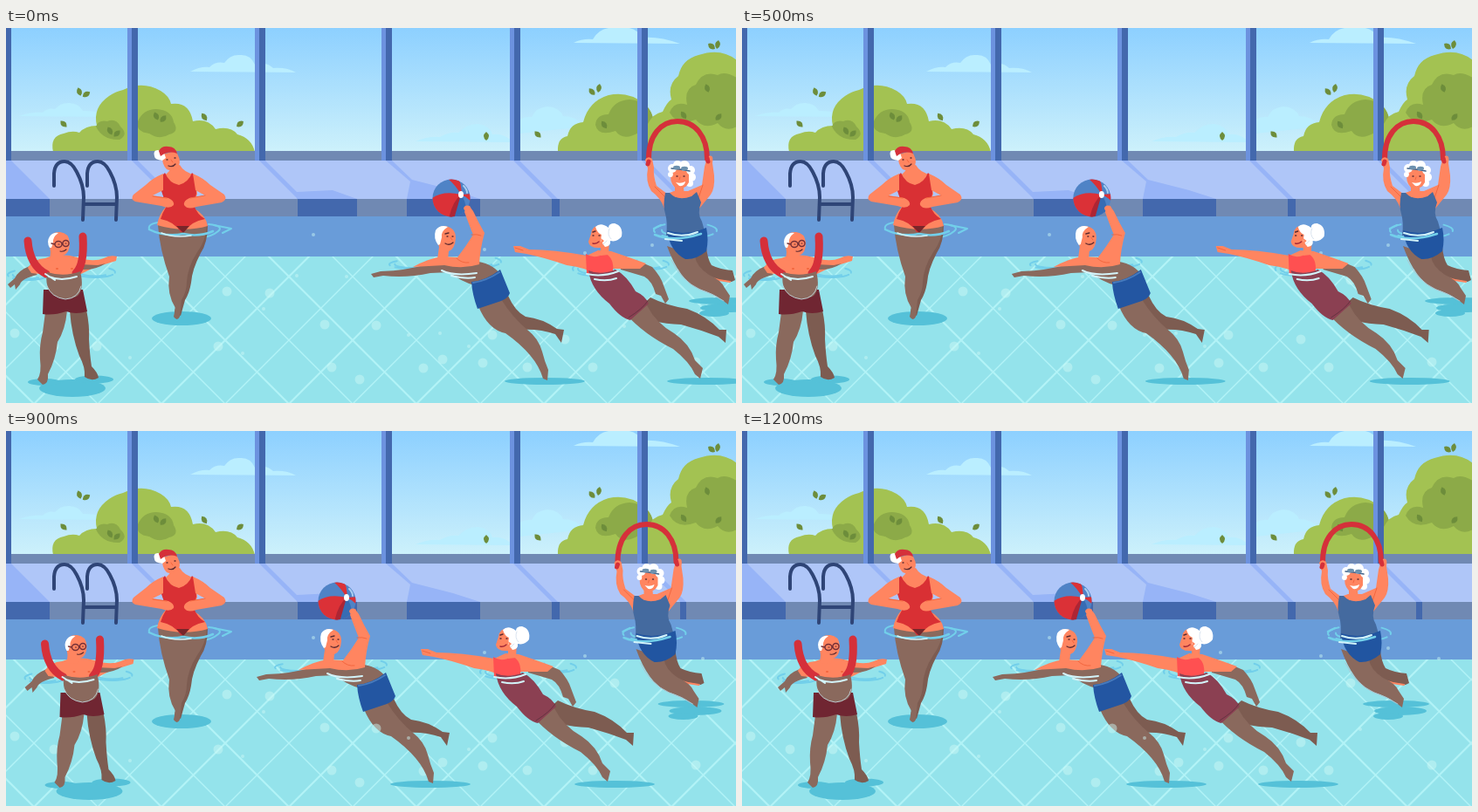
An HTML page with a canvas for the animation above (3.2 s loop, 836 by 430 pixels).

```html
<!DOCTYPE html>
<html lang="en">
<head>
<meta charset="utf-8">
<title>Water aerobics</title>
<style>
html, body { margin: 0; width: 100%; height: 100%; overflow: hidden; }
canvas { display: block; width: 100vw; height: 100vh; }
</style>
</head>
<body>
<canvas id="stage" width="836" height="430"></canvas>
<script>
const W = 836, H = 430, LOOP = 3200, STEP = 100;
const c = document.getElementById('stage').getContext('2d');

const SKIN = '#ff8560', BLUSH = '#f3673f', WET = '#8a695d', WET_DARK = '#7d5c51';
const SHADOW = '#55c1d8', RIPPLE = '#72cfea', FOAM = '#d3f4fa', INK = '#5b2a30';
const RED = '#d5303a', WHITE = '#fff';

function fill(d, color) {
  c.fillStyle = color;
  c.fill(new Path2D(d));
}

function line(d, color, width = 1) {
  c.strokeStyle = color;
  c.lineWidth = width;
  c.lineCap = c.lineJoin = 'round';
  c.stroke(new Path2D(d));
}

function oval(x, y, rx, ry, color) {
  c.fillStyle = color;
  c.beginPath();
  c.ellipse(x, y, rx, ry, 0, 0, 7);
  c.fill();
}

function box(x, y, w, h, color) {
  c.fillStyle = color;
  c.fillRect(x, y, w, h);
}

function leaf(x, y, turn = 0) {
  c.save();
  c.translate(x, y);
  c.rotate(turn);
  fill('M0 -5Q6 0 0 5Q-6 0 0 -5Z', '#6d8d3b');
  c.restore();
}

// Broken arcs around a body at the surface
function ripple(x, y, rx, ry) {
  c.strokeStyle = RIPPLE;
  c.lineWidth = 2;
  c.lineCap = 'round';
  for (const [k, a, b] of [[1, 0.5, 2.4], [1, 2.9, 4], [1, 5.5, 6.4], [0.75, 0.8, 3.2]]) {
    c.beginPath();
    c.ellipse(x, y, rx * k, ry * k, 0, a, b);
    c.stroke();
  }
}

function drawSky() {
  const g = c.createLinearGradient(0, 0, 0, 142);
  g.addColorStop(0, '#8dd0ff');
  g.addColorStop(1, '#cdf1fb');
  c.fillStyle = g;
  c.fillRect(0, 0, W, 142);
  const cloud = '#baeeff';
  fill('M211 50Q222 44 233 45Q240 38 250 40Q257 30 268 31Q280 30 285 42Q298 38 306 46Q322 45 332 51Z', cloud);
  fill('M15 101Q29 96 42 97Q48 91 56 93Q63 85 73 86Q84 87 88 95Q106 94 116 102Z', cloud);
  fill('M469 130Q483 124 497 125Q507 119 518 120Q529 109 541 110Q554 112 557 122Q570 120 581 131Z', cloud);
  fill('M588 105Q595 101 602 102Q607 91 620 90Q634 91 638 101Q653 101 663 113L588 121Z', cloud);
  fill('M650 17Q660 12 672 13Q678 2 690 0L714 0Q724 2 727 11Q748 9 772 18Z', cloud);
}

function drawTrees() {
  const green = '#a3c252', dark = '#8caa48';
  c.save();
  c.beginPath();
  c.rect(0, 0, W, 142);
  c.clip();
  fill('M54 142Q50 124 66 121Q76 117 84 120Q91 112 104 112Q99 91 118 78Q125 73 134 71Q156 60 177 72Q187 78 189 87Q210 84 214 107Q231 103 240 116Q257 112 265 122Q281 126 285 142Z', green);
  fill('M103 113Q106 105 116 107Q126 103 131 113Q141 122 130 128Q111 129 103 113ZM151 107Q157 93 172 93Q190 94 192 108Q199 119 187 122Q176 129 164 121Q148 119 151 107Z', dark);
  fill('M632 142Q631 126 643 124Q646 109 661 108Q667 84 690 77Q713 72 731 87Q741 95 742 111L752 142Z', green);
  fill('M675 111Q676 99 690 99Q696 83 714 82Q739 84 742 108L748 129Q729 129 726 119Q707 131 698 118Q678 125 675 111Z', dark);
  fill('M733 142L735 110Q741 98 752 96Q757 85 762 82Q757 65 770 55Q774 36 793 31Q819 22 837 37L837 142Z', green);
  fill('M760 97Q765 83 780 88Q776 69 790 65Q798 48 815 54Q823 49 837 57L837 113Q824 120 815 109Q799 117 790 105Q769 113 760 97Z', dark);
  c.restore();
  leaf(84, 73, -.3); leaf(92, 76, 1); leaf(66, 110, -.8); leaf(227, 102, -.6); leaf(268, 110, .9);
  leaf(172, 101, -.4); leaf(180, 104, .7); leaf(119, 118, -.5); leaf(127, 121, .8);
  leaf(550, 124); leaf(609, 122, -.8); leaf(671, 73, -.7); leaf(679, 69, .2); leaf(685, 111, -.6);
  leaf(808, 21, -.9); leaf(815, 19, .2); leaf(803, 69, -.3); leaf(776, 100, -.6); leaf(816, 102, .7);
}

function drawHall() {
  box(0, 141, W, 11, '#7089b3');
  box(0, 152, W, 44, '#afc6f8');
  box(0, 196, W, 20, '#7089b3');
  const shade = '#97b4f7', deep = '#4368ad';
  fill('M0 152L6 152L50 196L0 196Z', shade);
  for (const x of [144, 290, 581, 728]) fill(`M${x} 152h7l44 44h-7Z`, shade);
  fill('M333 188L374 186L402 196L333 196Z', shade);
  fill('M435 152L442 152L465 174L512 186L543 196L459 196L463 176Z', shade);
  for (const [x, w] of [[0, 50], [188, 7], [334, 68], [459, 84], [625, 9], [772, 7]]) box(x, 196, w, 20, deep);
  box(0, 0, 6, 152, deep);
  for (const x of [139, 285, 430, 577, 723]) {
    box(x, 0, 5, 152, '#6c92df');
    box(x + 5, 0, 7, 152, deep);
  }
}

function drawPool() {
  box(0, 216, W, 46, '#699cd9');
  box(0, 262, W, H - 262, '#94e3eb');
  c.save();
  c.beginPath();
  c.rect(0, 262, W, H - 262);
  c.clip();
  for (let i = 0; i < 16; i++) {
    const x = i * 73 - 210, w = i % 2 ? 2.2 : 1.4;
    line(`M${x} 262l168 168`, '#b2f3f7', w);
    line(`M${x + 46} 262l-168 168`, '#b2f3f7', w);
  }
  c.restore();
}

function drawLadder() {
  const rail = 'M55 181L55 167Q56 153 67 153Q75 153 81 165Q89 180 89 194L88 220';
  line(rail, '#2f4577', 4);
  c.save();
  c.translate(38, 0);
  line(rail, '#2f4577', 4);
  c.restore();
  line('M89 202L126 202', '#2f4577', 4);
}

function drawStretcher() {
  oval(201, 333, 34, 8, SHADOW);
  line('M164 231Q162 224 176 223M232 225Q250 227 243 233Q236 239 222 241', RIPPLE, 2);
  fill('M206 228L231 226Q231 246 223 258Q213 277 212 292Q210 304 205 312L200 330L193 326Z', WET_DARK);
  fill('M174 226L230 226Q229 244 219 257Q208 274 207 291Q207 302 201 312L199 331Q196 337 192 331L194 321Q184 305 187 285Q176 254 174 226Z', WET);
  fill('M189 160L199 157Q204 166 216 168L219 190L214 206Q229 214 231 227Q203 235 173 226Q175 214 183 205L179 188L177 170Q186 168 189 160Z', SKIN);
  fill('M182 166Q187 178 198 180Q209 177 213 166L217 170L218 190L215 203Q219 214 228 219Q211 222 204 234L200 234Q193 222 177 219Q179 212 184 204L178 187L178 170Z', '#d93034');
  fill('M195 227L210 227L203 235Z', '#78262a');
  fill('M180 167Q168 172 160 180L146 191Q142 196 148 199L178 204Q188 208 192 203Q193 198 186 195L168 192L180 186Z', SKIN);
  fill('M214 167Q226 172 234 180L250 191Q254 197 247 200L218 205Q208 209 204 203Q203 198 210 195L228 192L217 186Z', SKIN);
  line('M168 193L184 195M228 192L211 195', BLUSH);
  fill('M179 145L194 141Q201 150 198 158Q192 166 184 162Q178 156 179 145Z', SKIN);
  fill('M174 140Q168 140 170 147Q170 151 179 152L183 149L181 143Z', WHITE);
  fill('M175 141Q178 135 186 136Q194 136 196 144Q186 140 177 147Z', RED);
  line('M184 151h1M193 149h1M186 158Q191 160 194 156', INK, 1.3);
  line('M189 151L191 154', BLUSH);
  line('M164 231Q182 240 203 236Q221 240 237 233', RIPPLE, 2.5);
  line('M178 235Q192 241 212 238', FOAM, 1.5);
  line('M238 226L258 230L248 235', RIPPLE, 2);
}

function drawNoodleMan() {
  oval(76, 413, 38, 10, SHADOW);
  oval(101, 403, 22, 4.5, SHADOW);
  oval(44, 406, 19, 4, SHADOW);
  ripple(25, 283, 23, 6);
  ripple(102, 280, 23, 6);
  fill('M73 324L92 323Q96 342 95 357Q96 375 98 388Q105 395 106 401Q98 406 90 400Q91 389 84 376Q75 352 73 324Z', WET_DARK);
  fill('M45 326L70 324Q68 346 59 360Q57 380 48 397Q49 408 42 409L36 403Q41 396 39 380Q38 363 42 349Z', WET);
  fill('M27 273Q14 278 10 287L2 294L5 298L10 294L11 300L16 294Q18 287 36 283Z', WET);
  fill('M45 264Q31 265 25 275L29 281L47 283L84 283L98 276L113 271L126 267L127 262Q119 260 112 264Q100 269 82 263Q62 257 45 264Z', SKIN);
  fill('M86 277Q102 278 114 270L105 272L85 271Z', WET);
  line('M25 244Q27 272 46 282', RED, 9);
  line('M88 239Q90 272 80 281', RED, 9);
  fill('M43 300L88 300L93 325Q80 329 69 325Q54 330 42 328Z', '#702632');
  fill('M47 280Q67 286 85 279Q90 299 82 307Q68 315 54 306Q44 297 47 280Z', WET);
  line('M47 296Q52 309 68 311Q83 310 86 296', '#bdcbd1', 1);
  line('M49 285Q63 291 81 285M45 282L56 289', FOAM, 2);
  fill('M49 243Q52 233 62 234Q72 235 73 246Q73 259 65 261L63 266L50 267L51 257Z', SKIN);
  fill('M50 252Q46 245 50 239Q54 234 60 235Q53 240 54 246L52 252Z', WHITE);
  c.strokeStyle = '#743037';
  c.lineWidth = 1.4;
  c.beginPath();
  c.ellipse(60, 248, 4, 3.5, 0, 0, 7);
  c.moveTo(72, 247);
  c.ellipse(68.5, 247, 3.5, 3.5, 0, 0, 7);
  c.moveTo(52, 247);
  c.lineTo(56, 248);
  c.stroke();
  line('M60 248h1M68 247h1M62 256Q66 257 69 254', INK, 1.2);
  line('M58 276h1M75 276h1', BLUSH, 2);
}

function drawBall(x, y) {
  c.save();
  c.translate(x, y);
  c.beginPath();
  c.arc(0, 0, 21.5, 0, 7);
  c.clip();
  box(-22, -22, 44, 44, '#4f83c6');
  fill('M11 -4Q-9 -9 -22 0L-22 12Q-17 21 0 23Q9 10 11 -4Z', '#db3137');
  fill('M11 -4Q1 4 -3 24L3 24Q10 10 11 -4Z', '#ad2534');
  fill('M11 -4Q5 -15 -5 -23L8 -23Q13 -13 11 -4ZM11 -4Q19 -1 24 6L24 -5Z', '#db3137');
  fill('M11 -4L3 24L16 20Q19 7 11 -4Z', '#376cb4');
  oval(11, -4, 3, 4, WHITE);
  line('M14 -14Q18 -10 18 -6', '#a9cef0', 2);
  c.restore();
}

function drawBallMan() {
  oval(617, 405, 46, 4, SHADOW);
  ripple(464, 271, 25, 5);
  ripple(545, 268, 22, 6);
  fill('M558 311L575 307Q583 325 595 331Q614 333 631 345L639 346L636 361L629 351Q611 345 592 346Q571 336 558 311Z', WET_DARK);
  fill('M541 319L567 311Q580 332 597 346Q610 356 614 371Q617 383 621 392L620 404L615 402Q611 388 600 375Q589 362 572 350Q552 346 541 319Z', WET);
  fill('M418 282L429 279Q459 278 482 271L505 266L535 267Q556 269 566 282L537 295Q521 291 508 280L486 281Q459 287 432 284L421 286Z', WET);
  fill('M466 274Q484 264 500 262L517 263Q527 250 535 237Q530 225 524 208L529 203L535 210Q541 223 548 235Q543 253 542 271Q523 277 502 272Z', SKIN);
  line('M533 237Q539 236 544 238', BLUSH);
  line('M516 264Q522 270 530 269', BLUSH);
  drawBall(510, 195);
  fill('M524 207Q525 202 531 204L535 211L529 216Z', SKIN);
  fill('M492 239Q493 226 503 227Q515 229 515 241Q514 254 507 256L506 266L494 265L496 251Z', SKIN);
  fill('M495 249Q489 241 492 232Q497 225 506 228Q498 233 499 240L497 248Z', WHITE);
  line('M505 239h1M511 239h1M503 236L507 235M503 247Q508 250 512 246', INK, 1.3);
  line('M509 240L511 243', BLUSH);
  fill('M533 291Q549 290 566 277L577 304Q575 310 567 313L540 322Q534 306 533 291Z', '#2356a2');
  line('M535 292Q550 290 565 280', '#477bbd', 2);
  line('M499 278Q513 285 539 281M510 284Q526 288 537 286', FOAM, 2);
}

function drawSwimmer() {
  oval(803, 405, 46, 4, SHADOW);
  ripple(673, 276, 24, 8);
  ripple(737, 271, 22, 6);
  fill('M719 326L738 309Q756 318 780 322Q802 330 817 346L825 346L824 361L816 354Q795 346 773 340Q738 339 719 326Z', WET_DARK);
  fill('M710 328L734 318Q744 338 765 350Q783 362 789 381L798 390L795 402L789 397Q783 383 764 368Q730 351 710 328Z', WET);
  fill('M702 263Q725 267 740 274Q750 285 753 295L759 311L755 316L750 307L744 305Q740 290 731 285L704 277Z', WET);
  fill('M581 250L589 250L599 254Q627 254 665 261L678 255L693 256Q711 262 733 270L726 276L696 276L678 283Q665 275 642 272Q616 263 596 259L583 257Z', SKIN);
  fill('M664 259Q674 266 686 258Q697 264 695 280L665 282Z', '#ff5051');
  fill('M667 278Q681 284 698 277Q711 284 721 302Q732 307 736 316L715 335Q704 333 691 316Q670 300 667 278Z', '#8b4052');
  line('M713 332Q729 322 735 313', '#653340', 1);
  fill('M670 236Q671 226 682 226Q693 228 691 242L690 260L681 261L681 252Q668 253 667 245Z', SKIN);
  fill('M675 228Q681 222 690 229Q690 224 697 224Q707 227 705 239Q700 246 692 244Q693 250 686 251L681 244L682 237Q677 235 675 228Z', WHITE);
  line('M691 230Q688 237 693 242M688 244L684 248', '#d9e3ef', 1);
  line('M672 238h1M679 238h1M672 234L675 233', INK, 1.4);
  line('M672 247Q676 248 679 245', '#a32938', 1.5);
  fill('M681 241L685 244L682 247Z', SKIN);
  line('M665 282Q683 286 701 279M674 288Q688 291 699 287', FOAM, 2);
  line('M583 252L592 255', BLUSH, 1);
}

function drawNoodleLady() {
  oval(820, 313, 38, 4, SHADOW);
  oval(825, 321, 30, 5, SHADOW);
  oval(811, 327, 17, 4, SHADOW);
  ripple(778, 232, 36, 9);
  fill('M783 254L802 251Q803 264 808 272Q818 277 832 278L835 289L831 291L820 289Q802 289 793 280Z', WET_DARK);
  line('M806 286Q817 290 829 291', SKIN, 2);
  fill('M757 250L789 261Q790 273 805 283Q819 289 823 298L829 307L827 317L819 311Q809 304 793 299Q771 289 757 250Z', WET);
  line('M762 266Q773 290 795 300Q810 305 822 313', '#adc5d1', 1);
  line('M736 153C735 122 751 107 769 107C789 107 803 124 803 150', RED, 6);
  fill('M732 151Q735 146 740 150L742 160Q741 169 745 181L757 190L765 187L781 187L797 180L800 159L803 148Q811 143 809 155L811 169Q812 184 807 191L794 207L754 207Q750 195 739 187Q732 176 735 161Z', SKIN);
  line('M736 153L735 156M803 149L804 153', RED, 5);
  line('M743 182L755 194M798 180L793 195', BLUSH);
  fill('M755 189L760 189Q769 199 785 193L791 188L796 200Q791 213 797 222L801 236L756 238Q758 223 755 213Q752 204 755 189Z', '#446a9f');
  fill('M757 232Q779 239 802 229Q805 243 802 256Q790 266 778 265Q760 256 757 232Z', '#2155a1');
  fill('M762 163Q764 155 773 157Q784 159 783 171Q782 181 776 183L777 194L766 194L766 183Q759 176 762 163Z', SKIN);
  for (const [x, y, r] of [[763, 161, 5], [769, 157, 5], [777, 158, 6], [784, 163, 5], [785, 171, 5], [783, 178, 4], [761, 168, 3]]) oval(x, y, r, r, WHITE);
  fill('M764 167Q773 165 782 168L782 177Q779 183 773 183Q765 182 763 175Z', SKIN);
  line('M762 161Q773 162 783 164', '#43658b', 1.5);
  oval(768, 160, 4, 2.3, '#6d91af');
  oval(777, 161, 4, 2.3, '#6d91af');
  line('M768 170h1M776 170h1', INK, 1.4);
  line('M772 171L771 174', BLUSH);
  fill('M767 177Q773 179 778 176Q777 182 771 181Z', WHITE);
  line('M743 237Q765 246 796 236M750 226L742 230', RIPPLE, 2.5);
  line('M758 235Q775 241 792 234M755 242L774 244', FOAM, 2);
}

function drawBubbles(r, places) {
  c.globalAlpha = .48;
  for (const [x, y] of places) oval(x, y, r, r, '#cdf8f5');
  c.globalAlpha = 1;
}

function drawBackBubbles() {
  drawBubbles(5.5, [[10, 350], [55, 365], [104, 365], [243, 365], [253, 302], [302, 304], [365, 340],
    [373, 389], [405, 403], [478, 390], [500, 380], [546, 384], [557, 352],
    [597, 389], [640, 357], [672, 389], [697, 289], [790, 383]]);
  drawBubbles(2, [[142, 378], [271, 373], [295, 322], [333, 284], [352, 237], [390, 285],
    [497, 350], [530, 365], [548, 254], [663, 258], [708, 342], [740, 249], [798, 261]]);
}

function drawFrontBubbles() {
  drawBubbles(5.5, [[424, 341]]);
  drawBubbles(2, [[461, 352]]);
}

function at(dx, draw) {
  c.save();
  c.translate(dx, 0);
  draw();
  c.restore();
}

function render(now) {
  const step = Math.min(12, Math.floor((now % LOOP) / STEP));
  const first = Math.min(step, 6), second = Math.max(step - 6, 0);
  c.clearRect(0, 0, W, H);
  drawSky();
  drawTrees();
  drawHall();
  drawPool();
  drawLadder();
  drawBackBubbles();
  drawStretcher();
  at(second * 6.5, drawNoodleMan);
  at(-second * 71 / 6, drawNoodleLady);
  at(-first * 131 / 6, drawBallMan);
  at(-first * 46 / 6 - second * 20, drawSwimmer);
  drawFrontBubbles();
}

function tick() {
  render(performance.now());
  requestAnimationFrame(tick);
}
tick();
</script>
</body>
</html>
```
